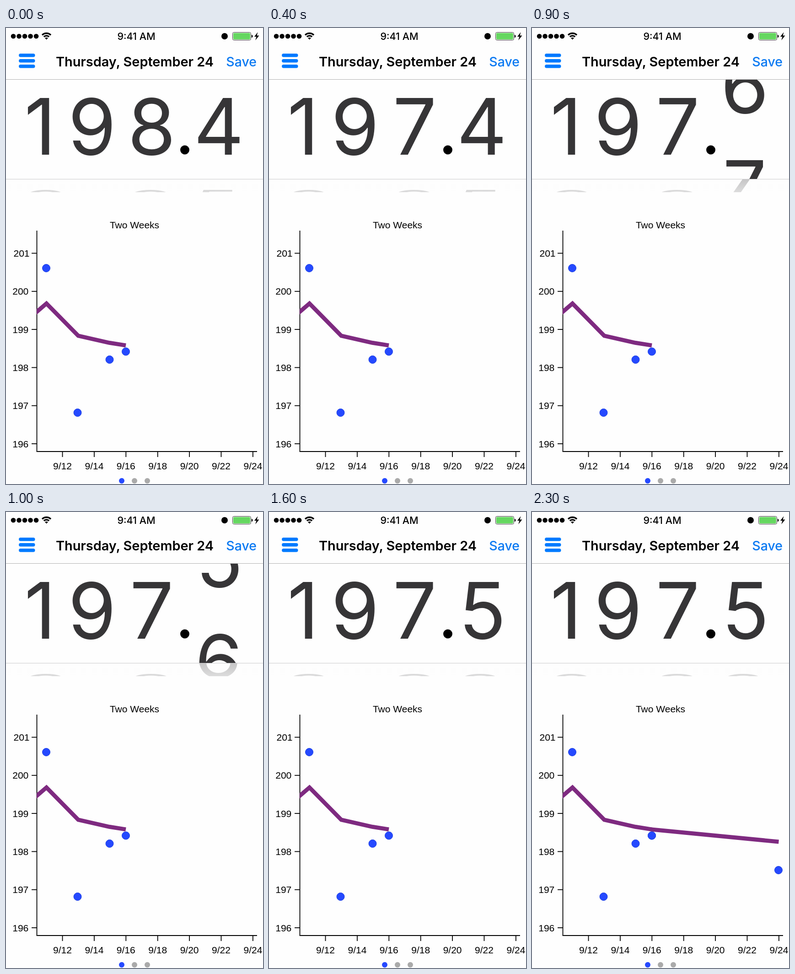
These frames come from a looping animation (562x997 px, 2400 ms). An HTML page with a canvas:

```html
<!DOCTYPE html>
<html lang="en">
<head>
<meta charset="utf-8">
<title>Weight log</title>
<style>
  html, body { margin: 0; width: 100%; height: 100%; overflow: hidden; background: #fefefe; }
  svg, canvas { position: absolute; left: 0; display: block; }
  svg { top: 0; }
  canvas { top: 113px; }
  .ui { font-family: Inter, sans-serif; }
  .chart { font: 21px "Liberation Sans", Arial, sans-serif; }
  .axis { stroke: #000; stroke-width: 1.8; fill: none; }
  .trend { stroke: #7e2a80; stroke-width: 9; fill: none; }
  .point { fill: #2549ff; stroke: #1c3fe0; stroke-width: 1; }
</style>
</head>
<body>
<canvas id="wheels" width="562" height="246"></canvas>
<svg width="562" height="997" viewBox="0 0 562 997">
  <defs><clipPath id="plot"><rect x="67" y="443" width="481" height="483"/></clipPath></defs>

  <g id="signal"></g>
  <g fill="none" stroke="#000" stroke-width="3.4">
    <path d="M79 15.4a13.6 13.6 0 0 1 19 0"/>
    <path d="M82.8 19.2a8.2 8.2 0 0 1 11.4 0"/>
  </g>
  <path d="M88.5 25.6l-3.4-3.5a4.8 4.8 0 0 1 6.8 0z"/>
  <circle cx="478" cy="18" r="7"/>
  <rect x="495.5" y="9.5" width="40" height="17" rx="3" fill="#fff" stroke="#333"/>
  <rect x="497" y="11" width="37" height="14" rx="2" fill="#65d760"/>
  <path d="M537 15q2.5 0 2.5 3t-2.5 3z"/>
  <path d="M550.5 9l-7.5 10h4.6l-2.4 8 8.3-10.5h-4.8z"/>

  <g class="ui">
    <text x="285" y="25.5" font-size="21.5" font-weight="500" text-anchor="middle">9:41 AM</text>
    <text x="281.5" y="84" font-size="28.9" font-weight="600" text-anchor="middle">Thursday, September 24</text>
    <text x="548" y="84" font-size="28.5" font-weight="500" text-anchor="end" fill="#0a79f2">Save</text>
  </g>
  <g fill="#007aff">
    <rect x="28" y="56" width="35.5" height="7.5" rx="3.7"/>
    <rect x="28" y="68" width="35.5" height="7.5" rx="3.7"/>
    <rect x="28" y="80" width="35.5" height="7.5" rx="3.7"/>
  </g>
  <path d="M0 112.5H562" stroke="#b2b2b2"/>
  <path d="M0 330.5H562" stroke="#cbcbcd"/>
  <circle cx="391" cy="266.5" r="10"/>

  <g class="chart">
    <text x="281" y="438" text-anchor="middle">Two Weeks</text>
    <g id="ticks"></g>
    <path class="axis" d="M67.5 443V926H549"/>
    <path class="trend" clip-path="url(#plot)" d="M50 635.3L88.5 602.3 158 673 226 688.3 262 694"/>
    <g id="points"></g>
    <g id="saved" visibility="hidden">
      <path class="trend" d="M261 693.9L539.5 721"/>
      <circle class="point" cx="539" cy="783" r="8.5"/>
      <circle class="point" cx="262" cy="707.5" r="8.5"/>
    </g>
  </g>
  <circle cx="253" cy="990" r="6" fill="#2549ff"/>
  <circle cx="281" cy="990" r="6" fill="#aaa"/>
  <circle cx="309" cy="990" r="6" fill="#aaa"/>
</svg>
<script>
const LOOP = 2400, STEP = 100, SAVE_AT = 1900;
// Picker geometry, in canvas coordinates
const WIDTH = 562, HEIGHT = 246, FOLD = 218;
const PITCH = 227, MIDDLE = 102, HALF_CAP = 62;
const RADIUS = 161, ROW_ANGLE = 1.3, SHRINK = 0.048;
const $ = id => document.getElementById(id);

function add(parent, tag, attrs, text = '') {
  const el = document.createElementNS('http://www.w3.org/2000/svg', tag);
  for (const key in attrs) el.setAttribute(key, attrs[key]);
  el.textContent = text;
  parent.append(el);
}

for (let i = 0; i < 5; i++) add($('signal'), 'circle', { cx: 16 + i * 12.5, cy: 18, r: 5.3 });

for (let i = 0; i < 6; i++) {
  const y = 492.5 + i * 83.3;
  add($('ticks'), 'path', { class: 'axis', d: `M56 ${y}H68` });
  add($('ticks'), 'text', { x: i ? 49.3 : 51.5, y: y + 7.5, 'text-anchor': 'end' }, 201 - i);
}
for (let i = 0; i < 7; i++) {
  const x = 123.5 + i * 69.4;
  add($('ticks'), 'path', { class: 'axis', d: `M${x} 926V938` });
  add($('ticks'), 'text', { x, y: 964.5, 'text-anchor': 'middle' }, `9/${12 + 2 * i}`);
}
for (const [cx, cy] of [[88, 525], [156.5, 841], [226.5, 725], [262, 707.5]])
  add($('points'), 'circle', { class: 'point', cx, cy, r: 8.5 });

// Wheel positions at each step; the last value holds.
const wheels = [
  { x: 80, pos: [1] },
  { x: 188.5, pos: [9] },
  { x: 319, pos: [8, 7.85, 7.45, 7.1, 7] },
  { x: 465.5, pos: [4, 4, 4, 4, 4, 5.1, 7, 7.833, 7.3, 6.4, 5.5, 5.15, 5.01, 5] }
];
const nudge = { 1: -9, 5: 2.5 };

const ctx = $('wheels').getContext('2d');
const fade = ctx.createLinearGradient(0, FOLD, 0, HEIGHT);
fade.addColorStop(0, 'rgba(254,254,254,.72)');
fade.addColorStop(1, 'rgba(254,254,254,.83)');

function drawDigit(digit, x, y, sx = 1, sy = 1) {
  const m = ctx.measureText(digit);
  const middle = (m.actualBoundingBoxRight - m.actualBoundingBoxLeft) / 2;
  ctx.save();
  ctx.translate(WIDTH / 2, y);
  ctx.scale(sx, sy);
  ctx.fillText(digit, x + (nudge[digit] || 0) - middle - WIDTH / 2, HALF_CAP);
  ctx.restore();
}

const flatRow = (digit, x, offset) => drawDigit(digit, x, MIDDLE + offset * PITCH);

// Each row is a flat card turned around the drum.
function drumRow(digit, x, offset) {
  const angle = offset * ROW_ANGLE;
  if (Math.abs(angle) >= Math.PI / 2) return;
  const cos = Math.cos(angle);
  drawDigit(digit, x, MIDDLE + RADIUS * Math.sin(angle), 1 - SHRINK * (1 - cos), cos);
}

function drawBand(top, bottom, drawRow, step) {
  ctx.save();
  ctx.beginPath();
  ctx.rect(0, top, WIDTH, bottom - top);
  ctx.clip();
  for (const { x, pos } of wheels) {
    const p = pos[Math.min(step, pos.length - 1)];
    for (let d = Math.max(0, Math.floor(p) - 1); d <= Math.min(9, Math.ceil(p) + 1); d++)
      drawRow(d, x, d - p);
  }
  ctx.restore();
}

function drawWheels(step) {
  ctx.clearRect(0, 0, WIDTH, HEIGHT);
  ctx.font = '170px Inter, sans-serif';
  ctx.fillStyle = '#363537';
  drawBand(0, FOLD, flatRow, step);
  drawBand(FOLD, HEIGHT, drumRow, step);
  ctx.fillStyle = fade;
  ctx.fillRect(0, FOLD, WIDTH, HEIGHT - FOLD);
}

let start, shown = -1;
function frame(now) {
  start ??= now;
  const step = Math.floor(((now - start) % LOOP) / STEP);
  if (step !== shown) {
    shown = step;
    drawWheels(step);
    $('saved').setAttribute('visibility', step * STEP >= SAVE_AT ? 'visible' : 'hidden');
  }
  requestAnimationFrame(frame);
}
drawWheels(0);
requestAnimationFrame(frame);
</script>
</body>
</html>
```
